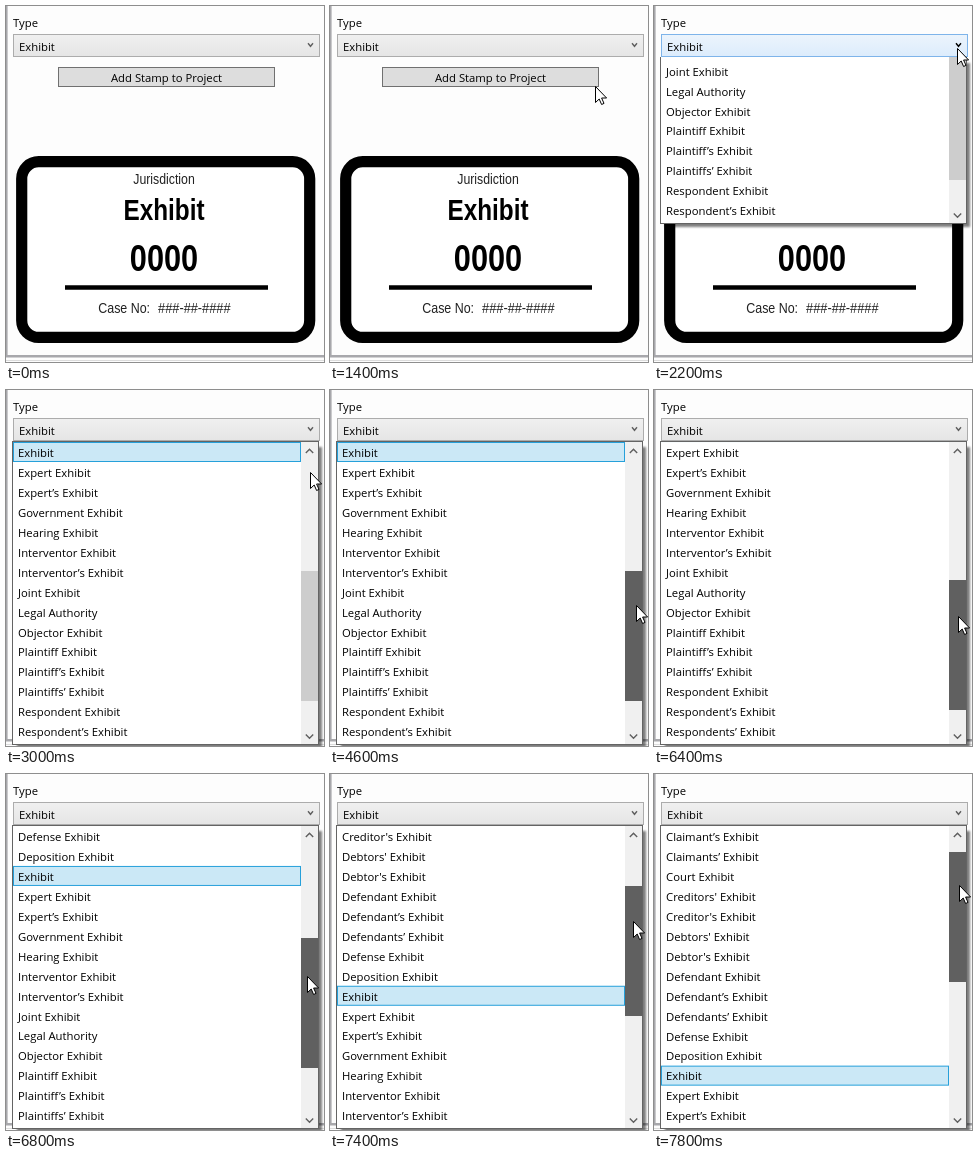
Animation, 318 px wide and 356 px high, one loop 8 s. Source, as an HTML page:

```html
<!DOCTYPE html>
<html lang="en">
<head>
<meta charset="utf-8">
<title>Stamp type picker</title>
<style>
  html, body { margin: 0; width: 100%; height: 100%; overflow: hidden; background: #fdfdfd; }
  #stage { display: block; }
  text { font: 11.3px "Open Sans", "Noto Sans", sans-serif; fill: #000; white-space: pre; }
  .stamp text { font-family: "Liberation Sans", Arial, sans-serif; text-anchor: middle; }
  .chevron { fill: none; stroke: #606060; stroke-width: 1.4; }
</style>
</head>
<body>
<svg id="stage" width="318" height="356" viewBox="0 0 318 356">
  <defs>
    <linearGradient id="plain" x2="0" y2="1"><stop stop-color="#f0f0f0"/><stop offset="1" stop-color="#e5e5e5"/></linearGradient>
    <linearGradient id="hover" x2="0" y2="1"><stop stop-color="#ecf4fc"/><stop offset="1" stop-color="#dcecfc"/></linearGradient>
    <filter id="soft"><feGaussianBlur stdDeviation="1"/></filter>
    <filter id="scan"><feGaussianBlur stdDeviation=".4"/></filter>
  </defs>

  <rect width="318" height="356" fill="#fdfdfd"/>
  <path d="M0 0h1.6v349H318v2.5H0z" fill="#a8a8ac"/>
  <path d="M0 354.5H318" stroke="#dcdcdc"/>

  <text x="7" y="20.5">Type</text>
  <rect id="combo" x="7.5" y="28.5" width="306" height="22"/>
  <text x="13" y="45">Exhibit</text>
  <path class="chevron" id="arrow" d="M302 37.3l2.5 3 2.5-3"/>

  <rect x="52.5" y="61.5" width="216" height="19" fill="#ddd" stroke="#707070"/>
  <text x="160.5" y="76" text-anchor="middle">Add Stamp to Project</text>

  <!-- the stamp preview is a soft, slightly narrowed image -->
  <g class="stamp" filter="url(#scan)">
    <rect x="15.7" y="155.7" width="288" height="175.7" rx="17" fill="#fff" stroke="#000" stroke-width="11.2"/>
    <path d="M59 281.5H262" stroke="#000" stroke-width="4.6"/>
    <g transform="translate(158 0) scale(.83 1)">
      <text y="178" style="font-size:14.8px;fill:#222">Jurisdiction</text>
      <text y="214" style="font-size:29.3px;font-weight:700">Exhibit</text>
      <text y="265.4" style="font-size:37px;font-weight:700">0000</text>
      <text x="-48" y="307" style="font-size:15px;fill:#222">Case No:</text>
      <text x="36.5" y="307" style="font-size:15.4px;fill:#222">###-##-####</text>
    </g>
  </g>

  <g id="popup">
    <rect id="shadow" x="11" y="57" width="305" fill="#000" opacity=".5" filter="url(#soft)"/>
    <svg id="view" x="6" y="51" width="307">
      <g id="slide">
        <rect x=".5" y=".5" width="306" height="303" fill="#fff" stroke="#646464"/>
        <svg y="1" width="290" height="300"><g id="list"></g></svg>
        <rect x="289" y="1" width="17" height="302" fill="#f0f0f0"/>
        <rect id="thumb" x="289" width="17" height="130"/>
        <path class="chevron" d="M293.8 12l3.7-3.7 3.7 3.7M293.8 293.5l3.7 3.7 3.7-3.7"/>
      </g>
    </svg>
  </g>

  <path id="cursor" d="M.5 .5V16.5L4.2 13 6.6 18.5 9 17.4 6.6 12H11.6z" fill="#fff" stroke="#000"/>
</svg>

<script>
const $ = id => document.getElementById(id);
const set = (id, attrs) => { for (const k in attrs) $(id).setAttribute(k, attrs[k]); };

const names = ["Claimant’s", "Claimants’", "Court", "Creditors'", "Creditor's", "Debtors'", "Debtor's",
  "Defendant", "Defendant’s", "Defendants’", "Defense", "Deposition", "", "Expert", "Expert’s",
  "Government", "Hearing", "Interventor", "Interventor’s", "Joint", "Legal Authority", "Objector",
  "Plaintiff", "Plaintiff’s", "Plaintiffs’", "Respondent", "Respondent’s", "Respondents’", "Trial", "Trustee"];
const ROW = 19.97, SELECTED = 12, LAST = 15, FULL = 304;
const THUMB_STEP = 8.6, GRAB_Y = 215, PRESS = 4600;

$("list").innerHTML =
  `<rect x="1.5" y="${SELECTED * ROW + .5}" width="287" height="19" fill="#cbe8f6" stroke="#26a0da"/>` +
  names.map((n, i) => {
    const label = n === "Legal Authority" ? n : (n + " Exhibit").trim();
    return `<text x="6" y="${i * ROW + 14.8}">${label}</text>`;
  }).join("");

// pointer path: time, x, y
const path = [[200, 70, 70], [400, 188, 157], [600, 188, 157], [1800, 303, 42], [2200, 303, 42],
  [3000, 304, 82], [4200, 306, 215], [4600, 306, 215], [5600, 308, 263], [5800, 308, 263],
  [6800, 301, 202], [7800, 305, 111]];

function pointer(t) {
  const i = path.findIndex(p => p[0] >= t);
  if (i < 1) return path[0].slice(1);
  const [a, b] = [path[i - 1], path[i]];
  const k = (t - a[0]) / (b[0] - a[0]);
  return [1, 2].map(j => a[j] + (b[j] - a[j]) * k);
}

function draw(t) {
  const [x, y] = pointer(t).map(Math.round);
  const over = t > 400 && y > 29 && y < 51;
  set("cursor", { transform: `translate(${x} ${y})`, visibility: t < 200 ? "hidden" : "visible" });
  set("combo", { fill: `url(#${over ? "hover" : "plain"})`, stroke: over ? "#7eb4ea" : "#acacac" });
  $("arrow").style.stroke = over ? "#000" : "#606060";

  const height = t < 2200 ? 0 : t < 2400 ? 167 : FULL;
  set("popup", { visibility: height ? "visible" : "hidden" });
  set("shadow", { height: Math.max(0, height - 3) });
  set("view", { height });
  set("slide", { transform: `translate(0 ${height - FULL})` });

  const drag = t >= PRESS;
  const first = drag
    ? Math.max(0, Math.min(LAST, Math.round(SELECTED + (y - GRAB_Y) / THUMB_STEP)))
    : SELECTED;
  set("list", { transform: `translate(0 ${-first * ROW})` });
  set("thumb", { y: Math.round(27 + first * THUMB_STEP), fill: drag ? "#606060" : y > 181 ? "#a6a6a6" : "#cdcdcd" });
}

function tick() {
  const t = performance.now() % 8000;
  draw(Math.floor(t / 200) * 200);
  requestAnimationFrame(tick);
}
tick();
</script>
</body>
</html>
```
